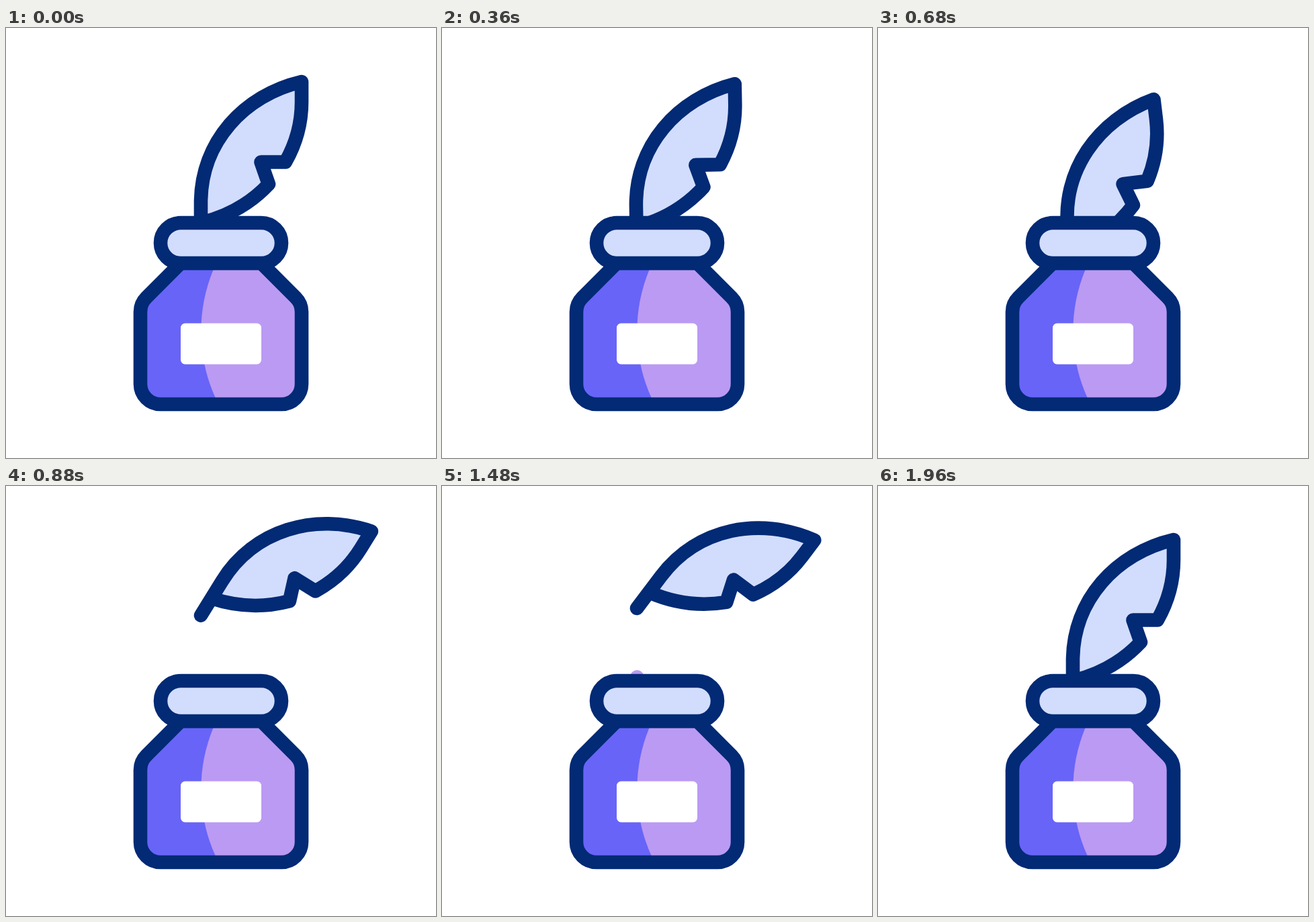
Animation of 640x640 px, one loop 2 s. Source, as an HTML page:

```html
<!DOCTYPE html>
<html lang="en">
<head>
<meta charset="utf-8">
<title>Quill and ink</title>
<style>
  html, body { margin: 0; width: 100%; height: 100%; overflow: hidden; background: #fff; }
  svg { display: block; width: 100vw; height: 100vh; }
  .line { stroke: #022a75; stroke-width: 20.6; stroke-linecap: round; stroke-linejoin: round; }
</style>
</head>
<body>
<svg viewBox="0 0 640 640">
  <line id="drop" x1="290.3" x2="290.3" stroke="#bb9af3" stroke-width="20.6" stroke-linecap="round"/>
  <path id="quill" class="line" fill="#d2ddfd"
    d="M290 320V260C290 170 354 100 440 80V110C440 142 431 173 416 199.5H379.5L391 232.5C363 262 328 281 290 290"/>
  <path id="glass" fill="#6864f8"
    d="M260 350L208.8 401.2A30 30 0 0 0 200 422.4V530A30 30 0 0 0 230 560H410A30 30 0 0 0 440 530V422.4A30 30 0 0 0 431.2 401.2L380 350Z"/>
  <path fill="#bb9af3"
    d="M308.5 360A240 240 0 0 0 311.5 550L315 560H410A30 30 0 0 0 440 530V422.4A30 30 0 0 0 431.2 401.2L380 350H312Z"/>
  <use href="#glass" class="line" style="fill-opacity:0"/>
  <rect x="260" y="439.5" width="120" height="61" rx="6.5" fill="#fff"/>
  <rect class="line" x="230" y="290" width="180" height="60" rx="30" fill="#d2ddfd"/>
</svg>
<script>
const LOOP = 2000, STEP = 40;
const quill = document.getElementById('quill');
const drop = document.getElementById('drop');

// Keyframes as [time in ms, value]
const lift = [[78, 0], [235, 53], [393, 0], [560, 53], [640, 53], [920, -138], [1560, -138], [1960, 0]];
const tilt = [[78, 0], [235, -9], [393, 0], [560, -9], [640, -9], [944, 37], [1560, 37], [1960, 0]];
const dropTop = [[920, 180], [1560, 289]];
const dropEnd = [[920, 180], [1360, 289]];

const ease = x => x * x * (3 - 2 * x);

function valueAt(keys, t) {
  if (t <= keys[0][0]) return keys[0][1];
  for (let i = 1; i < keys.length; i++) {
    const [t0, a] = keys[i - 1], [t1, b] = keys[i];
    if (t < t1) return a + (b - a) * ease((t - t0) / (t1 - t0));
  }
  return keys[keys.length - 1][1];
}

function draw(t) {
  quill.setAttribute('transform', `translate(0 ${valueAt(lift, t)}) rotate(${valueAt(tilt, t)} 290 320)`);
  drop.setAttribute('y1', valueAt(dropTop, t));
  drop.setAttribute('y2', valueAt(dropEnd, t));
  drop.setAttribute('visibility', t > 920 && t < 1800 ? 'visible' : 'hidden');
}

const start = performance.now();
function tick() {
  const t = (performance.now() - start) % LOOP;
  draw(Math.floor(t / STEP) * STEP);
  requestAnimationFrame(tick);
}
draw(0);
requestAnimationFrame(tick);
</script>
</body>
</html>
```
